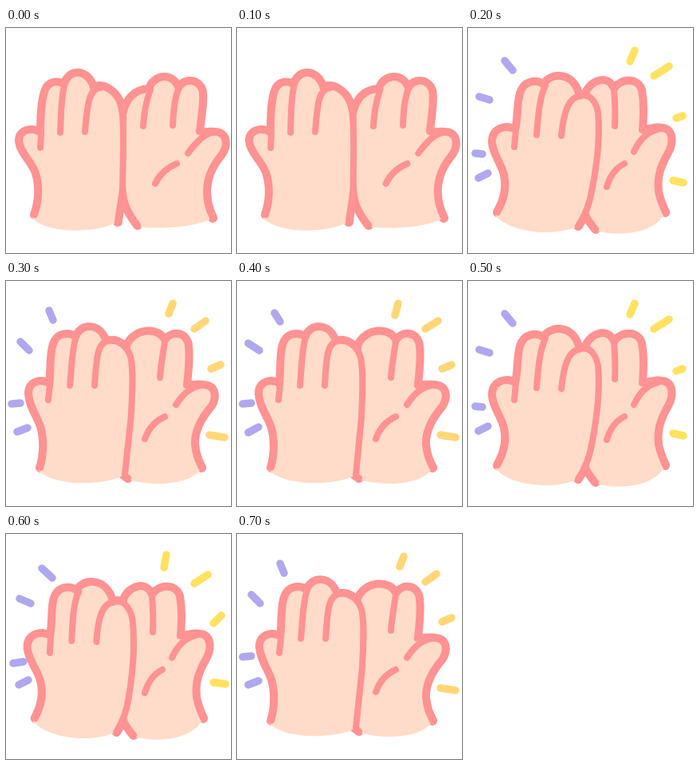
These frames come from a looping animation (282 by 282 pixels, 800 ms). An HTML page with a canvas:

```html
<!DOCTYPE html>
<html lang="en">
<head>
<meta charset="utf-8">
<title>Clapping hands</title>
<style>
html, body { margin: 0; width: 100%; height: 100%; overflow: hidden; background: #fff; }
canvas { display: block; width: 282px; height: 282px; }
</style>
</head>
<body>
<canvas width="282" height="282"></canvas>
<script>
const ctx = document.querySelector('canvas').getContext('2d');
const SKIN = '#ffdcc9', LINE = '#ff9292', PURPLE = '#b0a8ee';
const BASE = 240; // wrists stay put while the fingers lean

// edge: outline from wrist to wrist, base: wrist curve, inner: finger lines
const open = {
  right: {
    edge: 'M165,247C150,228 146,215 146,190L147,108C151,90 161,77 180,77C184,59 210,55 216,77C223,61 245,65 246,82C247,100 243,115 242,130C249,133 254,130 260,131C276,130 278,146 270,158C258,172 251,188 251,205C251,220 255,230 259,238',
    base: 'C240,249 200,253 165,249Z',
    inner: 'M228,157C236,146 246,134 258,131M172,123C173,105 177,88 181,77M209,122C210,105 211,90 216,77M187,195Q195,178 214,170'
  },
  left: {
    edge: 'M36,234C42,218 43,198 38,182C34,168 18,156 17,141C17,128 34,124 44,133C44,110 45,92 49,80C53,66 68,66 73,73C78,50 103,52 109,75C122,69 136,79 142,92C147,105 147,120 147,150L146,200C145,215 141,230 140,243',
    base: 'C112,258 50,258 33,238Z',
    inner: 'M43,150L44,133M68,131C69,108 69,88 73,73M99,130C102,95 104,76 118,75'
  }
};
const clap = {
  right: {
    edge: 'M160,252C150,240 146,232 146,225L148,82C154,66 176,58 183,78C190,64 212,62 217,78C220,95 219,110 218,128C228,128 236,124 242,126C258,126 256,146 250,156C240,174 236,186 238,205C240,216 243,222 247,231',
    base: 'C235,258 190,262 160,254Z',
    inner: 'M208,155C214,142 224,130 238,127M184,123C185,105 184,90 183,78M174,199Q180,178 196,170'
  },
  left: {
    edge: 'M37,231C47,214 49,198 46,184C43,170 32,158 31,143C31,127 46,121 60,128C64,110 62,96 66,82C70,68 84,64 95,72C100,58 132,52 139,86C150,80 160,90 163,106C166,140 160,180 155,205C152,222 146,236 138,248',
    base: 'C110,262 55,258 34,235Z',
    inner: 'M58,149L60,128M86,134C88,108 90,86 97,72M117,135C120,105 126,86 142,85'
  }
};
const rest = {
  right: {
    edge: 'M153,247L145,241L152,81C161,59 193,58 199,76C206,62 227,64 228,82C230,100 227,115 226,131C235,132 242,129 248,131C263,132 263,146 257,156C245,170 235,186 236,205C237,218 241,226 245,234',
    base: 'C235,254 190,259 153,249Z',
    inner: 'M213,155C220,144 230,133 244,131M193,121C194,105 197,90 199,76M174,198Q181,178 199,170'
  },
  left: {
    edge: 'M43,234C48,218 48,198 44,184C40,170 29,158 28,141C28,127 42,122 54,130C56,110 54,94 58,80C62,66 76,64 86,71C91,54 116,52 123,76C138,71 151,82 155,96C159,115 157,145 156,170L149,243',
    base: 'C120,259 55,256 39,236Z',
    inner: 'M52,149L54,130M79,131C81,108 81,86 86,71M110,131C112,98 112,76 128,75'
  }
};

const rays = [
  ['M46,41L56,53M14,86L27,90M9,157L18,158M13,188L25,182',
   'M209,28L203,42M233,60L252,48M261,113L269,110M257,191L270,194', '#ffe25f'],
  ['M54,37L59,49M18,76L29,87M7,154L18,153M14,189L27,184',
   'M209,28L204,41M236,60L250,50M257,110L269,105M255,193L274,196', '#ffd777'],
  ['M47,40L54,51M14,78L28,87M7,154L18,153M14,190L27,183',
   'M202,28L198,43M236,60L252,50M257,110L269,105M255,193L274,196', '#ffd777'],
  ['M45,43L58,55M17,81L31,87M9,162L22,160M16,189L28,183',
   'M201,26L198,42M236,62L253,51M260,112L270,102M260,186L275,188', '#ffe25f']
];

// pose, lean of left hand, lean of right hand, rays
const steps = [
  [open, 0, 0], [open, .009, .009],
  [clap, 0, 0, 0], [rest, -.01, 0, 1],
  [rest, 0, 0, 2], [clap, 0, 0, 0],
  [clap, .035, 0, 3], [rest, -.01, 0, 1]
];

function stroke(d, color, width) {
  ctx.strokeStyle = color;
  ctx.lineWidth = width;
  ctx.stroke(new Path2D(d));
}

function leaning(lean, paint) {
  ctx.save();
  ctx.transform(1, 0, lean, 1, -lean * BASE, 0);
  paint();
  ctx.restore();
}

// The rim thickens the outline on the outside only
const rim = ({ edge }, lean) => leaning(lean, () => stroke(edge, LINE, 12));

const hand = ({ edge, base, inner }, lean) => leaning(lean, () => {
  ctx.fillStyle = SKIN;
  ctx.fill(new Path2D(edge + base));
  stroke(edge + inner, LINE, 8);
});

function draw(now) {
  const [pose, leanL, leanR, burst] = steps[Math.floor(now / 100) % steps.length];
  ctx.clearRect(0, 0, 282, 282);
  ctx.lineCap = ctx.lineJoin = 'round';
  for (const part of [rim, hand]) {
    part(pose.right, leanR);
    part(pose.left, leanL);
  }
  if (burst !== undefined) {
    const [cool, warm, yellow] = rays[burst];
    stroke(cool, PURPLE, 9.5);
    stroke(warm, yellow, 9.5);
  }
  requestAnimationFrame(draw);
}
requestAnimationFrame(draw);
</script>
</body>
</html>
```
